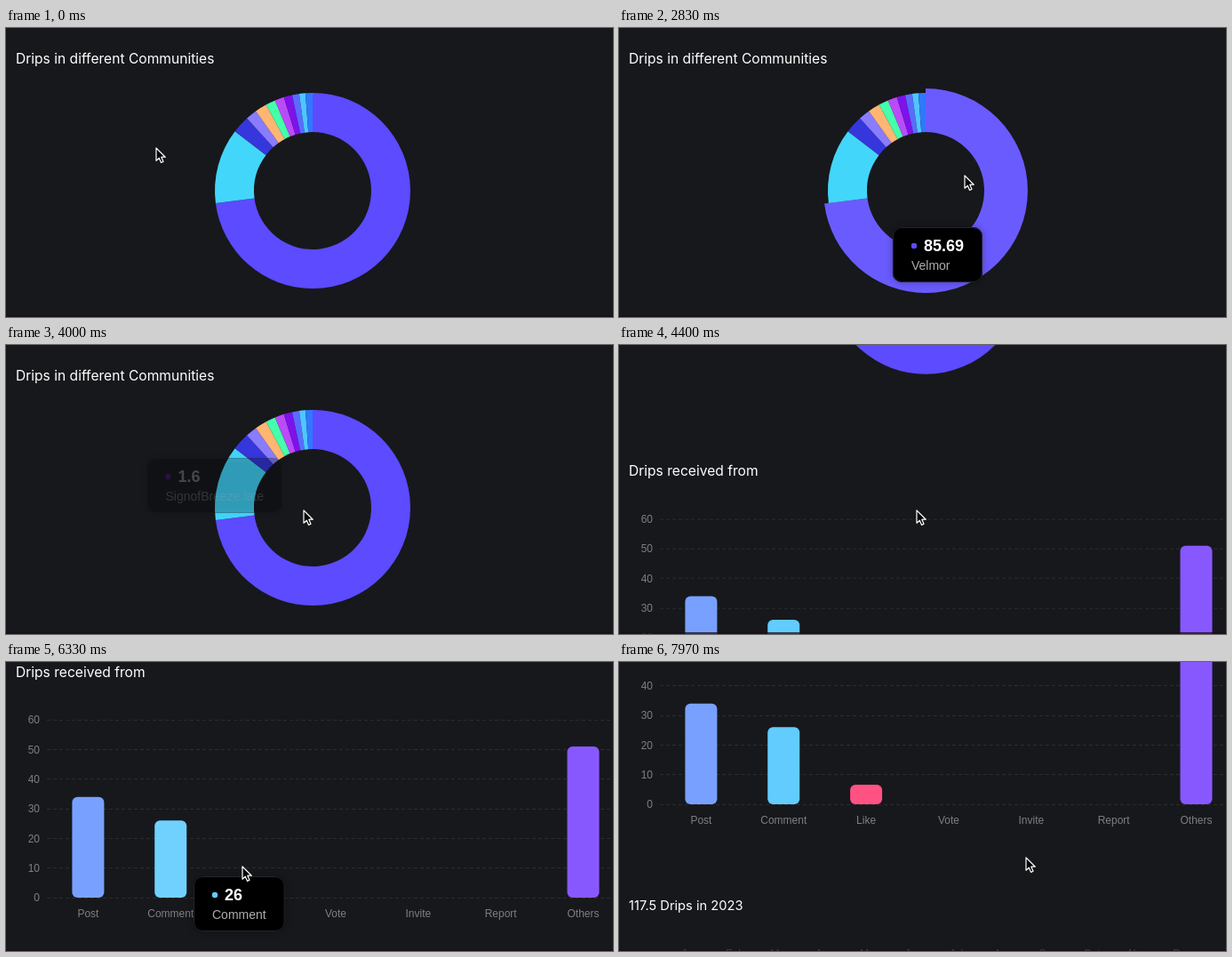
These frames come from a looping animation (683x325 px, 8 s). An HTML page with a canvas:

```html
<!DOCTYPE html>
<html lang="en">
<head>
<meta charset="utf-8">
<title>Drips dashboard</title>
<style>
  html, body { margin: 0; width: 100%; height: 100%; overflow: hidden; background: #17181c; }
  canvas { display: block; width: 683px; height: 325px; }
</style>
</head>
<body>
<canvas id="stage"></canvas>
<script>
const W = 683, H = 325, LOOP = 8000;
const canvas = document.getElementById('stage');
const ctx = canvas.getContext('2d');
const ratio = window.devicePixelRatio || 1;
canvas.width = W * ratio;
canvas.height = H * ratio;

const SANS = '"Liberation Sans", Arial, sans-serif';
const TITLE = 'Inter, sans-serif';
const BAR_TOP = 391;

// Clockwise end angle in degrees and colour of each donut slice.
const slices = [
  [262.7, '#5c4bff'], [307.4, '#43d6fb'], [317.8, '#3537dc'], [324.5, '#8a7cff'],
  [331.6, '#ffb672'], [337.4, '#45ffab'], [342.9, '#b94cf8'], [347.9, '#7d12ea'],
  [352.1, '#5a6bff'], [355.8, '#4fc6ff'], [360, '#2f78ff']
];
const bars = [
  ['Post', 34, '#78a1ff'], ['Comment', 26, '#62ccff'], ['Like', 6.6, '#ff5283'],
  ['Vote', 0], ['Invite', 0], ['Report', 0], ['Others', 51, '#8858ff']
];
const months = 'Jan Feb Mar Apr May Jun Jul Aug Sep Oct Nov Dec'.split(' ');

// Time in ms, then the pointer position.
const pointerPath = [
  [0, 169, 135], [30, 169, 135], [830, 50, 38], [1000, 52, 34], [1630, 228, 34], [1700, 228, 34],
  [2150, 350, 64], [2280, 368, 95], [2460, 420, 150], [2620, 429, 204], [2760, 429, 204],
  [2830, 389, 166], [3370, 372, 172], [3610, 331, 107], [3746, 331, 107], [4000, 335, 186],
  [4970, 335, 186], [5090, 178, 211], [5150, 178, 211], [5270, 154, 208], [5450, 95, 200],
  [5650, 92, 205], [5800, 125, 200], [6150, 191, 221], [6270, 191, 221], [6330, 266, 230],
  [6700, 380, 215], [7430, 458, 220], [8000, 458, 220]
];

const hovers = [
  { chart: 'donut', item: 0, from: 2220, to: 2760, value: '85.69', name: 'Velmor' },
  { chart: 'donut', item: 7, from: 3580, to: 3746, value: '1.6', name: 'SignofBreeze.late' },
  { chart: 'bars', item: 1, from: 5060, to: 5150, value: '26', name: 'Comment' },
  { chart: 'bars', item: 0, from: 5420, to: 5680, value: '34', name: 'Post' },
  { chart: 'bars', item: 1, from: 6060, to: 6270, value: '26', name: 'Comment' }
];

const clamp = (v, lo = 0, hi = 1) => Math.min(hi, Math.max(lo, v));
const progress = (t, from, length) => clamp((t - from) / length);
const smooth = p => p * p * (3 - 2 * p);
const colorOf = h => h.chart === 'donut' ? slices[h.item][1] : bars[h.item][2];

function pointerAt(t) {
  const i = Math.max(1, pointerPath.findIndex(k => k[0] >= t));
  const [t0, x0, y0] = pointerPath[i - 1], [t1, x1, y1] = pointerPath[i];
  const p = smooth(progress(t, t0, t1 - t0));
  return [x0 + (x1 - x0) * p, y0 + (y1 - y0) * p];
}

function scrollAt(t) {
  const first = 1 - (1 - progress(t, 4110, 690)) ** 2;
  return BAR_TOP * first + 105 * smooth(progress(t, 7440, 530));
}

function emphasis(t, chart, item) {
  return Math.max(0, ...hovers.filter(h => h.chart === chart && h.item === item)
    .map(h => progress(t, h.from, 120) * (1 - progress(t, h.to + 70, 50))));
}

function setFont(size, family, weight = 400) {
  ctx.font = `${weight} ${size}px ${family}`;
}

// y is the middle of the capitals.
function text(str, x, y, color, size, { family = SANS, weight = 400, align = 'left' } = {}) {
  setFont(size, family, weight);
  ctx.textAlign = align;
  ctx.fillStyle = color;
  ctx.fillText(str, x, y + size * 0.36);
}

const title = (str, y, size = 15.6) => text(str, 11, y, '#fff', size, { family: TITLE });

function fillLit(color, lit) {
  ctx.fillStyle = color;
  ctx.fill();
  if (!lit) return;
  ctx.fillStyle = `rgba(255,255,255,${0.09 * lit})`;
  ctx.fill();
}

function roundBox(x, y, w, h, r) {
  ctx.beginPath();
  ctx.roundRect(x, y, w, h, r);
}

function drawDonut(t) {
  title('Drips in different Communities', 34);
  const rad = deg => (deg - 90) * Math.PI / 180;
  let start = 0;
  slices.forEach(([end, color], i) => {
    const lit = emphasis(t, 'donut', i);
    ctx.beginPath();
    ctx.arc(345, 183, 110 + 5 * lit, rad(start), rad(end));
    ctx.arc(345, 183, 66, rad(end), rad(start), true);
    ctx.closePath();
    fillLit(color, lit);
    start = end;
  });
}

function drawBars(t) {
  title('Drips received from', 11);
  ctx.strokeStyle = '#2b2c31';
  ctx.lineWidth = 1;
  ctx.setLineDash([4, 3]);
  for (let v = 0; v <= 60; v += 10) {
    const y = 265 - v * 10 / 3;
    text(v, 38, y, '#7e7f83', 12, { align: 'right' });
    ctx.beginPath();
    ctx.moveTo(46, Math.floor(y) + 0.5);
    ctx.lineTo(680, Math.floor(y) + 0.5);
    ctx.stroke();
  }
  ctx.setLineDash([]);
  bars.forEach(([name, value, color], i) => {
    const x = 92.4 + i * 92.85, h = value * 10 / 3;
    text(name, x, 283, '#7e7f83', 12, { align: 'center' });
    if (!value) return;
    roundBox(x - 18, 265 - h, 36, h, 6);
    fillLit(color, emphasis(t, 'bars', i));
  });
}

function drawYear() {
  title('117.5 Drips in 2023', 770, 14.7);
  months.forEach((m, i) => text(m, 70 + i * 50.3, 824, '#b4b5ba', 12));
}

function drawTooltip(t, hover) {
  const alpha = progress(t, hover.from, 150) * (1 - progress(t, hover.to + 100, 200));
  if (!alpha) return;
  setFont(18, SANS, 700);
  const valueWidth = ctx.measureText(hover.value).width;
  setFont(14, SANS);
  const w = Math.max(valueWidth + 14, ctx.measureText(hover.name).width) + 42;
  const edge = hover.chart === 'donut' ? 491 : W;

  // The box trails the pointer and flips to its left near the chart's edge.
  let x = 0, y = 0;
  const samples = 8;
  for (let i = 0; i < samples; i++) {
    const [px, py] = pointerAt(clamp(t - i * 18, hover.from, hover.to));
    x += (px + 20 + w > edge ? px - 20 - w : px + 20) / samples;
    y += (py + 20) / samples;
  }

  ctx.save();
  ctx.globalAlpha = alpha;
  ctx.translate(x, y);
  ctx.shadowColor = 'rgba(0,0,0,.3)';
  ctx.shadowBlur = 8 * ratio;
  roundBox(0, 0, w, 62, 10);
  ctx.fillStyle = '#000';
  ctx.fill();
  ctx.shadowColor = 'transparent';
  roundBox(0.5, 0.5, w - 1, 61, 10);
  ctx.strokeStyle = '#25262a';
  ctx.lineWidth = 1;
  ctx.stroke();
  ctx.beginPath();
  ctx.arc(24, 21, 3.2, 0, 7);
  ctx.fillStyle = colorOf(hover);
  ctx.fill();
  text(hover.value, 35, 21, '#fff', 18, { weight: 700 });
  text(hover.name, 21, 42.5, '#adadad', 14);
  ctx.restore();
}

const arrow = new Path2D('M0 0V14.2L3.3 11.2 5.6 16.4 8 15.3 5.8 10.2H10.3Z');
const beam = new Path2D('M-4-7.5Q0-7.5 0-4.5Q0-7.5 4-7.5M0-4.5V4.5M-4 7.5Q0 7.5 0 4.5Q0 7.5 4 7.5M-2 1H2');

function drawPointer(t) {
  const [x, y] = pointerAt(t);
  const overTitle = t < 4000 && x > 11 && x < 235 && y > 24 && y < 44;
  ctx.save();
  ctx.translate(x, y);
  ctx.lineJoin = 'round';
  ctx.strokeStyle = '#fff';
  if (overTitle) {
    ctx.lineWidth = 3.4;
    ctx.stroke(beam);
    ctx.strokeStyle = '#000';
    ctx.lineWidth = 1.3;
    ctx.stroke(beam);
  } else {
    ctx.fillStyle = '#000';
    ctx.fill(arrow);
    ctx.lineWidth = 1.2;
    ctx.stroke(arrow);
  }
  ctx.restore();
}

function draw(t) {
  ctx.setTransform(ratio, 0, 0, ratio, 0, 0);
  ctx.fillStyle = '#17181c';
  ctx.fillRect(0, 0, W, H);

  const scroll = scrollAt(t);
  ctx.save();
  ctx.translate(0, -scroll);
  drawDonut(t);
  drawYear();
  ctx.translate(0, BAR_TOP);
  drawBars(t);
  ctx.restore();

  hovers.forEach(h => drawTooltip(t, h));
  ctx.fillStyle = 'rgba(30,12,22,.75)';
  ctx.fillRect(0, H - 2, W, 2);
  drawPointer(t);
}

const began = performance.now();
function tick() {
  draw((performance.now() - began) % LOOP);
  requestAnimationFrame(tick);
}
tick();
</script>
</body>
</html>
```
